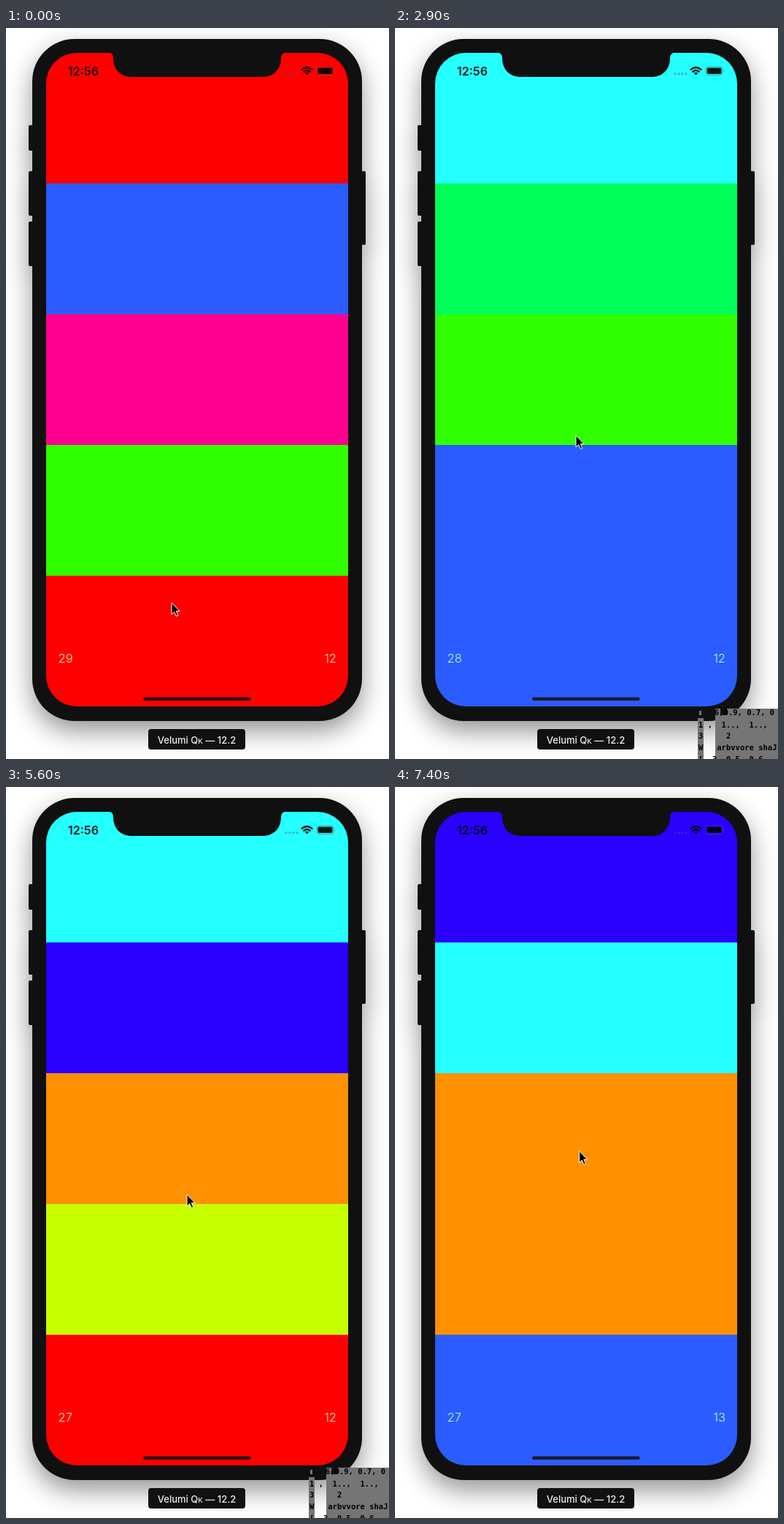
An HTML page for the animation above (8000 ms loop, 525x1001 px).

```html
<!DOCTYPE html>
<html lang="en">
<head>
<meta charset="utf-8">
<title>Colour bands</title>
<style>
  html, body { margin: 0; width: 100%; height: 100%; overflow: hidden; background: #fff; }
  svg { display: block; width: 100%; height: 100%; }
  text { font-family: Inter, Roboto, sans-serif; }
  #phone { filter: drop-shadow(0 14px 17px rgba(0, 0, 0, .42)); }
  #console text { font: bold 10.5px "DejaVu Sans Mono", monospace; white-space: pre; }
</style>
</head>
<body>
<svg viewBox="0 0 525 1001">
  <defs>
    <clipPath id="screen"><rect x="55" y="34" width="414" height="895" rx="42"/></clipPath>
  </defs>

  <g id="phone" fill="#101010">
    <rect x="36" y="15" width="452" height="934" rx="58"/>
    <rect x="31" y="133" width="8" height="35" rx="2"/>
    <rect x="31" y="196" width="8" height="61" rx="2"/>
    <rect x="31" y="265" width="8" height="61" rx="2"/>
    <rect x="485" y="196" width="8" height="101" rx="2"/>
  </g>

  <g id="bands" clip-path="url(#screen)"></g>
  <path fill="#101010" d="M140 33.500Q147 34 147 41C147 57 157 67 173 67H351C367 67 377 57 377 41Q377 34 384 33.500Z"/>

  <g id="status" fill="#000" fill-opacity=".9">
    <text x="85" y="64.500" font-size="16" font-weight="600">12:56</text>
    <g fill="#555" fill-opacity=".45">
      <circle cx="384" cy="62.500" r="1.600"/><circle cx="389" cy="62.500" r="1.600"/>
      <circle cx="394" cy="62.500" r="1.600"/><circle cx="399" cy="62.500" r="1.600"/>
    </g>
    <g fill="none" stroke="#000" stroke-opacity=".9" stroke-width="2.300">
      <path d="M404.800 57.500Q412.500 50.500 420.200 57.500M407.500 60.300Q412.500 55.800 417.500 60.300"/>
    </g>
    <path d="M409.800 61.800Q412.500 59.500 415.200 61.800L412.500 64.500Z"/>
    <rect x="426" y="53" width="23" height="11.500" rx="3" fill="none" stroke="#555" stroke-opacity=".5"/>
    <rect x="427.500" y="54.500" width="20" height="8.500" rx="1.800"/>
    <path d="M450.500 57Q452.500 58.800 450.500 60.800Z" fill="#555" fill-opacity=".5"/>
  </g>

  <g id="scores" font-size="16.500" font-weight="300">
    <text id="left" x="71.500" y="869"></text>
    <text id="right" x="453" y="869" text-anchor="end"></text>
  </g>
  <rect x="188" y="916.500" width="147.500" height="4.500" rx="2.250" fill="#171717" fill-opacity=".92"/>

  <rect x="195" y="960" width="133" height="28" rx="4" fill="#111"/>
  <text x="261.500" y="979.500" font-size="13" font-weight="500" fill="#eee" text-anchor="middle">Velumi Q<tspan font-size="9.500">K</tspan> — 12.2</text>

  <g id="console">
    <path fill="#757575" d="M415 944H423V1001H415ZM439 932H525V1001H439Z"/>
    <path fill="#101010" d="M415 932H455V941H439V945H415Z"/>
    <path fill="#757575" d="M417 935H420V941H417ZM439 932H446V941H439Z"/>
    <text x="438" y="941">6,0.9, 0.7, 0</text>
    <text x="416" y="958">1 ,  1..,  1..,</text>
    <text x="416" y="973">3     2</text>
    <text x="416" y="989">W   arbvvore shaJ</text>
    <text x="416" y="1005">[  3. 0.5, 0.6</text>
  </g>

  <path id="cursor" d="M0 0V16L3.700 12.600L6.400 18.400L8.800 17.300L6.300 11.500H11Z" fill="#000" stroke="#fff" stroke-width="1"/>
</svg>
<script>
const LOOP = 8000, TICK = 100, BAND = 179.1;
const red = '#ff0000', blue = '#2b5cff', pink = '#ff0090', green = '#2fff00', cyan = '#24ffff',
      mint = '#00ff5b', indigo = '#2a00ff', orange = '#ff9000', lime = '#c8ff00';

// Each list holds [start time, value] pairs.
const palettes = [
  [0, [red, blue, pink, green, red]],
  [100, [cyan, mint, green, blue, blue]],
  [3200, [blue, red, blue, indigo, blue]],
  [4900, [cyan, indigo, orange, lime, red]],
  [7200, [indigo, cyan, orange, orange, blue]]
];
const secondsLeft = [[0, 29], [2400, 28], [5500, 27]];
const points = [[0, 12], [6900, 13]];
const consoleShown = [[0, false], [2400, true], [6900, false]];

// Moves follow a quadratic curve: start point, control point, end point.
const moves = [
  { start: 1000, path: [[227, 787], [281, 690], [248, 558]] },
  { start: 6000, path: [[248, 558], [250, 525], [252.500, 498.500]] }
];
const MOVE_TIME = 600;

const $ = id => document.getElementById(id);
const valueAt = (list, t) => list.filter(([start]) => start <= t).pop()[1];

const bands = Array.from({ length: 5 }, (_, i) => {
  const rect = document.createElementNS('http://www.w3.org/2000/svg', 'rect');
  const box = { x: 55, y: 33.700 + i * BAND, width: 414, height: BAND + 1 };
  for (const key in box) rect.setAttribute(key, box[key]);
  return $('bands').appendChild(rect);
});

function cursorAt(t) {
  const { start, path: [a, b, c] } = t < moves[1].start ? moves[0] : moves[1];
  const p = Math.min(1, Math.max(0, (t - start) / MOVE_TIME));
  const s = p * p * (3 - 2 * p);
  return [0, 1].map(k => a[k] * (1 - s) ** 2 + 2 * b[k] * s * (1 - s) + c[k] * s * s);
}

function draw(now) {
  const t = Math.floor(now % LOOP / TICK) * TICK;
  const colors = valueAt(palettes, t);
  bands.forEach((band, i) => band.setAttribute('fill', colors[i]));
  $('scores').setAttribute('fill', colors[4] === red ? '#ffefb8' : '#baffff');
  $('left').textContent = valueAt(secondsLeft, t);
  $('right').textContent = valueAt(points, t);
  $('console').style.display = valueAt(consoleShown, t) ? '' : 'none';
  $('cursor').setAttribute('transform', `translate(${cursorAt(t)})`);
  requestAnimationFrame(draw);
}
draw(performance.now());
</script>
</body>
</html>
```
